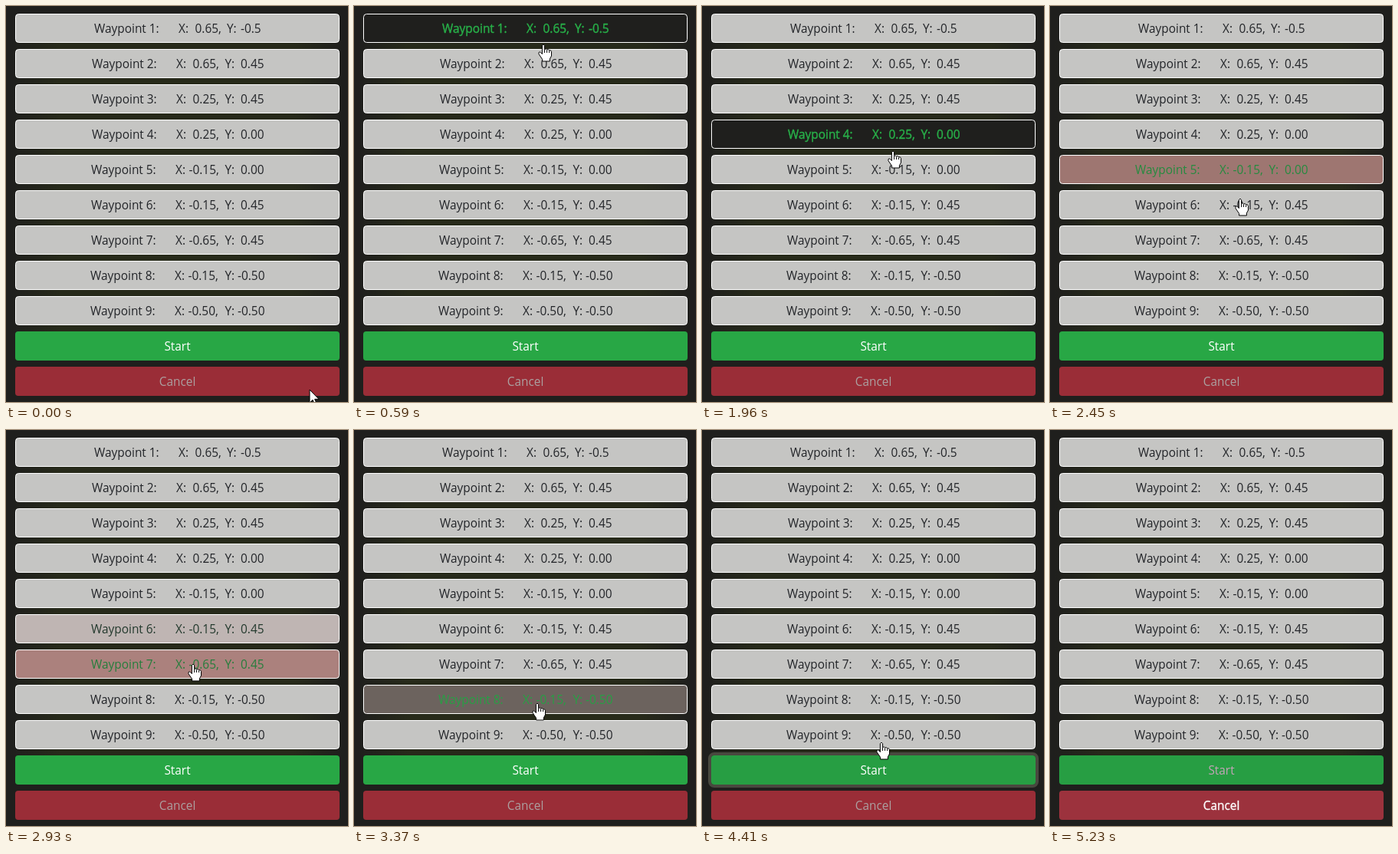
An HTML page that plays this animation: 446x516 px, repeating every 5.26 s.

```html
<!DOCTYPE html>
<html lang="en">
<head>
<meta charset="utf-8">
<title>Waypoints</title>
<style>
  html, body { margin: 0; width: 100%; height: 100%; overflow: hidden; background: #1f1f1d; }
  svg { display: block; width: 446px; height: 516px; }
  text { font: 15.4px "Open Sans", "Noto Sans", sans-serif; white-space: pre; }
</style>
</head>
<body>
<svg id="stage" viewBox="0 0 446 516">
  <defs>
    <linearGradient id="glow">
      <stop offset="0" stop-color="#272a1a" stop-opacity="0"/>
      <stop offset=".15" stop-color="#272a1a"/>
      <stop offset=".85" stop-color="#272a1a"/>
      <stop offset="1" stop-color="#272a1a" stop-opacity="0"/>
    </linearGradient>
  </defs>
  <rect x="6" y="46" width="434" height="378" fill="url(#glow)"/>
  <g id="list"></g>
  <g id="cursor" fill="#fff" stroke="#000" stroke-linejoin="round">
    <path id="arrow" d="M0 0V17L4 13.2L6.6 19.3L9.2 18.1L6.6 12.3H12Z"/>
    <g id="hand">
      <path d="M-1.6 1.6Q0 -1.4 1.6 1.6V6.6Q3.2 4.8 4.6 7Q6.4 5.4 7.6 8Q9.6 6.8 10.5 9.4V15L8.4 19V22H-1.4V19.4L-6 12.6Q-6.6 9.6 -4.4 9.8L-1.6 12.6Z"/>
      <path d="M1.6 6.6V11M4.6 7.4V11M7.6 8.4V11" fill="none"/>
    </g>
  </g>
</svg>
<script>
const LOOP = 5260, LAG = 100, FADE = 150, PITCH = 46;
const CLICK = 4160, SWAP = 4500;
const $ = id => document.getElementById(id);

const points = [
  ["0.65", "-0.5"], ["0.65", "0.45"], ["0.25", "0.45"],
  ["0.25", "0.00"], ["-0.15", "0.00"], ["-0.15", "0.45"],
  ["-0.65", "0.45"], ["-0.15", "-0.50"], ["-0.50", "-0.50"]
];

// Pointer path: time, x, y
const path = [
  [0, 396, 501], [330, 252, 28], [490, 247, 38], [590, 247, 50],
  [1060, 248, 81], [1175, 248, 94.5], [1250, 248, 102], [1350, 249, 141],
  [1590, 249, 163], [1945, 249, 186], [2130, 249, 218], [2275, 248, 232],
  [2350, 248, 240], [2450, 248, 251], [2660, 246, 274], [3100, 242, 324],
  [3180, 241, 332], [3370, 239, 356], [3570, 237, 370], [3610, 236, 378],
  [3730, 235, 412], [4000, 232, 441], [4200, 232, 441], [4270, 233, 424],
  [4310, 233, 416.5], [4410, 234, 407], [4680, 236, 378], [4720, 237, 370],
  [4790, 238, 338], [4840, 240, 324], [4970, 290, 424], [5100, 350, 475],
  [5190, 385, 520], [LOOP, 396, 520]
];

const LIGHT = [197, 197, 195], DARK = [31, 31, 29];
const fillStops = [[0, ...LIGHT], [.48, 168, 122, 117], [.62, 98, 95, 90], [1, ...DARK]];
const textStops = [[0, 34, 36, 40], [.6, 38, 160, 68], [1, 40, 176, 73]];

const clamp = v => Math.max(0, Math.min(1, v));
const ramp = (t, from) => clamp((t - from) / FADE);
const mix = (a, b, k) => a.map((v, i) => v + (b[i] - v) * k);
const rgb = c => `rgb(${c.map(Math.round)})`;

function sample(table, at) {
  let i = 1;
  while (i < table.length - 1 && table[i][0] < at) i++;
  const a = table[i - 1], b = table[i];
  return mix(a.slice(1), b.slice(1), clamp((at - a[0]) / (b[0] - a[0])));
}

function add(parent, tag, attrs, label) {
  const el = document.createElementNS("http://www.w3.org/2000/svg", tag);
  for (const key in attrs) el.setAttribute(key, attrs[key]);
  if (label) el.textContent = label;
  return parent.appendChild(el);
}

const box = (parent, y, attrs) =>
  add(parent, "rect", { x: 12, y, width: 423, height: 38, rx: 4, ...attrs });

const rows = points.map(([px, py], i) => {
  const top = 10 + i * PITCH;
  const negX = px[0] === "-", negY = py[0] === "-";
  const left = 112 + (i === 0 ? 3 : 0) - (negX ? 1 : 0) - (negX && negY ? 1 : 0);
  const rect = box($("list"), top + .5, { x: 12.5, width: 422, height: 37, stroke: "#fff" });
  const text = add($("list"), "text", { y: top + 25 });
  const parts = [
    [left, `Waypoint ${i + 1}:`],
    [left + 110, "X:"],
    [left + (negX ? 127.5 : 131.5), px + ","],
    [i === 0 ? 288 : 285.5, "Y:"],
    [i === 0 ? 306 : negY ? 302 : 306, py]
  ];
  for (const [x, label] of parts) add(text, "tspan", { x }, label);
  return { top, rect, text };
});

function button(top, label) {
  const rect = box($("list"), top);
  const text = add($("list"), "text", { x: 223.5, y: top + 25, "text-anchor": "middle" }, label);
  return { rect, text };
}
const ring = box($("list"), 422, { x: 10, width: 427, height: 42, rx: 6, fill: "none", stroke: "#49483f", "stroke-width": 4 });
const start = button(424, "Start");
const cancel = button(470, "Cancel");

// Share of the recent past spent inside a row gives a linear fade.
function hover(top, t) {
  const n = 30;
  let hits = 0;
  for (let i = 0; i < n; i++) {
    const at = t - LAG - FADE * (i + .5) / n;
    if (at < 0) continue;
    const y = sample(path, at)[1];
    if (y >= top && y <= top + 38) hits++;
  }
  return hits / n;
}

function paint(part, fill, ink, stroke = 0) {
  part.rect.setAttribute("fill", rgb(fill));
  part.text.setAttribute("fill", rgb(ink));
  part.text.setAttribute("stroke", rgb(ink));
  part.text.setAttribute("stroke-width", stroke);
}

function draw(t) {
  for (const row of rows) {
    const k = hover(row.top, t);
    paint(row, sample(fillStops, k), sample(textStops, k), k > .8 ? .4 : 0);
  }
  const press = ramp(t, CLICK - FADE / 2), swap = ramp(t, SWAP);
  ring.setAttribute("opacity", press * (1 - swap));
  paint(start, mix([40, 167, 69], [39, 158, 67], press), mix([255, 255, 255], [196, 164, 184], swap));
  paint(cancel, mix([154, 45, 55], [156, 50, 61], swap), mix([172, 160, 160], [255, 255, 255], swap), .35 * swap);

  const [x, y] = sample(path, t);
  const early = t < 110;
  $("cursor").setAttribute("transform", `translate(${Math.round(x)} ${Math.round(y)})`);
  $("arrow").setAttribute("visibility", early ? "visible" : "hidden");
  $("hand").setAttribute("visibility", early ? "hidden" : "visible");
}

const begin = performance.now();
function tick() {
  draw((performance.now() - begin) % LOOP);
  requestAnimationFrame(tick);
}
tick();
</script>
</body>
</html>
```
